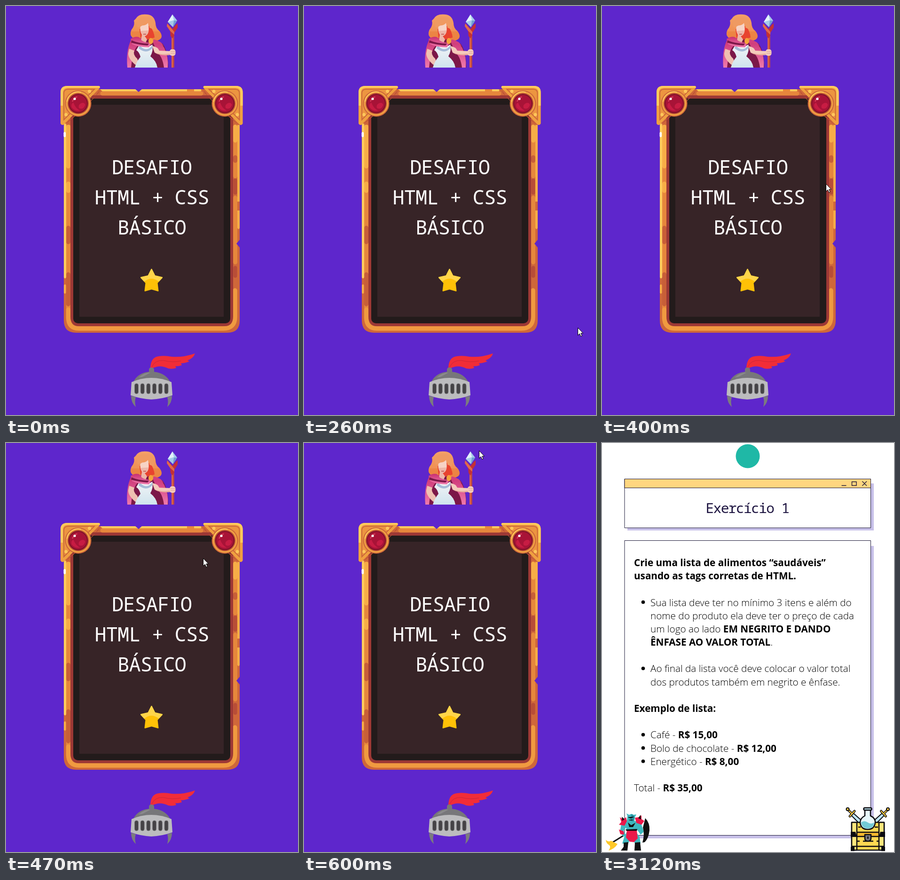
Recreate the animation shown at these times as an HTML page. Size 621 by 870 pixels, loop 8000 ms.

```html
<!DOCTYPE html>
<html lang="pt-BR">
<head>
<meta charset="utf-8">
<title>Desafio HTML + CSS</title>
<style>
html, body { margin: 0; width: 100%; height: 100%; overflow: hidden; background: #5e26cc; }
svg { display: block; width: 100%; height: 100%; }
.page, .pointer { animation: 8s step-end infinite; }
.page { animation-name: turn; }
.pointer { animation-name: sweep; }
@keyframes turn { 0% { opacity: 0; } 39%, 100% { opacity: 1; } }
@keyframes sweep {
  0% { opacity: 0; transform: translate(588px, 830px); }
  2.375% { opacity: 1; transform: translate(588px, 830px); }
  3.25% { opacity: 1; transform: translate(582px, 684px); }
  4.125% { opacity: 1; transform: translate(552px, 526px); }
  5% { opacity: 1; transform: translate(476px, 378px); }
  5.875% { opacity: 1; transform: translate(419px, 245px); }
  6.75% { opacity: 1; transform: translate(410px, 116px); }
  7.5% { opacity: 1; transform: translate(372px, 16px); }
  8.375%, 100% { opacity: 0; transform: translate(372px, 16px); }
}
.mono { font-family: "Noto Sans Mono", "DejaVu Sans Mono", monospace; text-anchor: middle; }
.sign { font-size: 42px; font-weight: 400; letter-spacing: -.9px; fill: #fff; }
.heading { font-size: 29.5px; font-weight: 500; letter-spacing: -1.6px; fill: #1d1440; }
.copy { font: 300 20.69px "Open Sans", "Noto Sans", sans-serif; fill: #000; }
.copy tspan { font-weight: 700; }
.box { fill: #fff; stroke: #1d1838; }
</style>
</head>
<body>
<svg viewBox="0 0 621 870">
  <defs>
    <linearGradient id="cape" x1="0" y1="0" x2="0" y2="1"><stop stop-color="#c92f70"/><stop offset="1" stop-color="#ef79ac"/></linearGradient>
    <linearGradient id="dress" x1="0" y1="0" x2="0" y2="1"><stop stop-color="#f3f4f6"/><stop offset="1" stop-color="#cfe4ee"/></linearGradient>
    <linearGradient id="hair" x1="0" y1="0" x2="0" y2="1"><stop stop-color="#f3a068"/><stop offset="1" stop-color="#ef8848"/></linearGradient>

    <g id="corner">
      <path fill="#b84c35" d="M123 254L143 238L186 197L200 178L196 186L178 203Z"/>
      <path fill="#f0a040" d="M130 170H198Q202 172 198 176L124 251Q119 256 116 250V184Q116 170 130 170Z"/>
      <path fill="#ffcb5c" d="M130 170H198Q201 172 199 174H131Q121 174 121 184V212H116V184Q116 170 130 170Z"/>
      <path fill="#ec9540" stroke="#cc673a" stroke-width="2" d="M132 177H188L123 242V186Q123 177 132 177Z"/>
      <circle cx="177.500" cy="181.500" r="3.500" fill="#ffc65a"/>
      <circle cx="127.500" cy="231" r="3.500" fill="#ffc65a"/>
    </g>
    <g id="gem">
      <circle r="28" fill="#cb643a"/>
      <circle r="26" fill="#f0a042"/>
      <path fill="none" stroke="#ffcb5c" stroke-width="2" d="M-24 -4A24 24 0 0 1 6 -24"/>
      <circle r="22.500" fill="#b84c35"/>
      <circle r="20.500" fill="#7d1029"/>
      <circle r="18.500" fill="#a81337"/>
      <path fill="#c71c43" d="M-14 8Q-16 0 -10 -2Q-6 10 4 15Q-7 17 -14 8ZM2 10Q-1 4 5 0Q13 -4 15 3Q11 14 2 10Z"/>
      <path fill="none" stroke="#d13a57" stroke-width="2.500" stroke-linecap="round" d="M-12 -5Q-9 -12 -3 -14"/>
      <circle cx="-7.500" cy="-10" r="2.600" fill="#fff"/>
    </g>
    <path id="cheek" fill="#7c7c7e" d="M266 829L276 832Q273 841 276 853Q266 844 266 829Z"/>
    <rect id="slot" x="-4" y="803" width="8" height="22" rx="4"/>
    <g id="sword">
      <path fill="#bfe5f5" stroke="#0b0b10" stroke-width="2" d="M533 786L562 812L556 818L529 791Z"/>
      <path stroke="#0b0b10" stroke-width="5" stroke-linecap="round" d="M523 780L532 789M537 783L527 794"/>
      <path stroke="#ffcf3f" stroke-width="2" stroke-linecap="round" d="M523 780L531 788M537 783L527 794"/>
      <circle cx="522.500" cy="779" r="3" fill="#ffcf3f" stroke="#0b0b10" stroke-width="2"/>
    </g>
  </defs>

  <rect width="621" height="870" fill="#5e26cc"/>

  <!-- sorceress -->
  <g>
    <path fill="#7c1848" d="M266 76Q300 62 333 80Q345 97 345 131H259Q256 100 266 76Z"/>
    <path fill="url(#cape)" d="M266 72Q280 64 292 70L283 83Q270 88 266 131H258Q255 94 266 72ZM310 72Q330 76 337 90Q346 108 344 131H336Q333 109 323 100Z"/>
    <path fill="#efc0b1" d="M262 91L273 95Q269 103 279 112L283 122L275 125Q260 112 260 101Z"/>
    <path fill="url(#dress)" d="M284 82Q299 91 311 82Q314 95 307 107Q320 117 322 131H274Q277 119 286 108Q283 97 277 94Z"/>
    <path fill="#a6bcd8" d="M284 84Q299 100 312 83V89Q299 104 282 90Z"/>
    <path fill="#f4cbbc" d="M311 85Q323 87 326 95L351 96V104Q328 106 316 99Z"/>
    <path fill="#e9ac9d" d="M316 99Q330 104 351 101V104Q328 107 316 99Z"/>
    <path fill="url(#hair)" d="M276 27Q282 16 300 18Q315 19 318 36Q318 47 326 53Q335 65 327 71Q317 78 307 69L280 68Q268 71 265 61Q264 53 270 46Q274 39 272 31Z"/>
    <path fill="#ec803e" d="M266 54H327Q335 66 327 71Q317 78 307 69L280 68Q268 71 265 61Z" opacity=".65"/>
    <path fill="#e8432f" d="M284 49L306 42Q315 54 316 67L299 72L286 67Z"/>
    <path fill="#f7d3c5" d="M286 41Q297 43 302 36Q306 54 300 61Q295 67 289 61Q284 53 286 41Z"/>
    <path fill="#edb6a8" d="M286 53L303 52Q302 61 295 64L300 71L297 78L287 74L289 61Z"/>
    <path fill="#ef9a62" d="M280 46Q291 44 299 31Q305 35 305 46L314 50Q318 34 305 24H288Q275 30 280 46Z"/>
    <path stroke="#b43b3a" stroke-width="1.300" d="M292 60H298"/>
    <path fill="url(#cape)" d="M265 70Q276 63 284 67Q289 79 310 78L304 88Q283 88 268 81Z"/>
    <path fill="#7c1848" d="M267 73Q283 80 304 80L301 84Q284 83 266 78Z"/>
    <path fill="#d2417f" d="M310 77L315 71Q331 75 335 85L326 80Z"/>
    <ellipse cx="308" cy="74.500" rx="5" ry="6.500" fill="#f5a43b"/>
    <path fill="#d96048" d="M352 58H357.500V131H352Z"/>
    <path fill="#b9433f" d="M355.500 65H357.500V131H355.500Z"/>
    <path fill="#c23037" d="M343 37L342 43L349 53L350 64L354 69L358 63V57L365 46V37L361 40L354 49Z"/>
    <path fill="#e2694b" d="M343 37L342 43L349 53L358 61V55Z"/>
    <path fill="#a5cbea" d="M354 18L364 31L355 45L344 34Z"/>
    <path fill="#e4f3fb" d="M354 18L357 30L344 34Z"/>
    <path fill="#6f9ed2" d="M357 31L364 31L355 45Z"/>
    <rect x="348" y="92" width="12.500" height="14" rx="5" fill="#f4cbbc"/>
    <path stroke="#dc9f92" d="M350 97H360M350 101H360"/>
  </g>

  <!-- framed board -->
  <path fill="#cf673a" d="M123 177H497V669Q497 695 471 695H149Q123 695 123 669Z"/>
  <path fill="#e6873c" d="M128 253H137V660H128Z"/>
  <path fill="none" stroke="#f09a40" stroke-width="9.500" stroke-linecap="round" d="M132.500 646V663Q133 686 155 686H462Q487 686 487 661V605"/>
  <path fill="#9d3835" d="M137 190H483V660Q483 681 465 681H155Q137 681 137 660Z"/>
  <rect x="143" y="197" width="334" height="478" rx="10" fill="#231b1b"/>
  <rect x="156" y="210" width="307" height="451" fill="#372427"/>

  <g fill="none" stroke-linecap="round">
    <path stroke="#e6873c" stroke-width="9" d="M205 186H415M487.500 257V362M487.500 408V545"/>
    <path stroke="#f7ad47" stroke-width="9" d="M132.500 257V341M132.500 378V393M487.500 257V286"/>
    <path stroke="#c85f38" stroke-width="9" d="M132.500 472V502M132.500 571V634M487.500 322V329"/>
    <path stroke="#b84d37" stroke-width="8" d="M487.500 371V397M487.500 557V574"/>
  </g>
  <path fill="#ffcb5c" d="M200 177H385V181.500H205ZM400 177H414Q417 179 414 181.500H400ZM123 250H128V577Q125.500 582 123 577Z"/>
  <path fill="#e6873c" d="M385 177H400V182H385Z"/>
  <path fill="#f7ad47" d="M123 594Q125.500 590 127.500 594V610Q125.500 614 123 610ZM492 253H497V416H492ZM492 435H497V472Q494.500 477 492 472Z"/>
  <rect x="122.500" y="268" width="4.500" height="11" rx="2.200" fill="#fff"/>
  <path fill="#5e26cc" d="M274 176H290L282 183ZM498 496V515L490 505.500Z"/>

  <use href="#corner"/>
  <use href="#corner" transform="translate(619.500) scale(-1 1)"/>
  <use href="#gem" x="153.500" y="207.500"/>
  <use href="#gem" x="465.500" y="207.500"/>

  <g class="mono sign">
    <text x="310" y="358">DESAFIO</text>
    <text x="310" y="422">HTML + CSS</text>
    <text x="310" y="486">BÁSICO</text>
  </g>

  <g stroke-linejoin="round" stroke-width="2">
    <path fill="#ffc107" stroke="#ffc107" d="M309.500 560L316.500 574L332 577.500L321.500 589L323.500 606L309.500 602L295.500 606L297.500 589L287 577.500L302.500 574Z"/>
    <path fill="#ffd54a" stroke="#ffd54a" d="M309.500 560L316.500 574L332 577.500L325 585Q309 573 294 585L287 577.500L302.500 574Z"/>
  </g>

  <!-- helmet -->
  <path fill="#f12d38" d="M307 772Q307 747 325 745Q338 743 352 746Q377 748 402 739Q399 749 386 754L390 756Q380 760 372 760L374 764Q366 767 360 766L362 770Q354 773 345 771Q327 762 311 771Z"/>
  <path fill="none" stroke="#c92539" d="M310 768Q316 753 335 754Q354 759 372 755"/>
  <path fill="#77777a" d="M271 799Q282 778 309 778Q337 778 349 799Z"/>
  <path fill="#8a8a8c" d="M282 790Q295 779 309 779L290 789Z"/>
  <path fill="#77777a" d="M304 780V774Q304 769 309 769Q315 769 315 774V780Z"/>
  <use href="#cheek"/>
  <use href="#cheek" transform="translate(619) scale(-1 1)"/>
  <path fill="#bcbcbe" d="M267 800Q288 791 309 791Q331 791 352 800L354 828Q332 836 309 837Q287 836 265 828Z"/>
  <g fill="#454346" stroke="#7f7f82">
    <use href="#slot" x="277.500"/><use href="#slot" x="290.200"/><use href="#slot" x="302.900"/>
    <use href="#slot" x="315.600"/><use href="#slot" x="328.300"/><use href="#slot" x="341"/>
  </g>

  <path class="pointer" fill="#fff" stroke="#000" stroke-linejoin="round" d="M.5 .5V16.500L4.200 13L6.800 18.800L9.300 17.700L6.800 12H11.500Z"/>

  <g class="page">
    <rect width="621" height="870" fill="#fff"/>
    <circle cx="310" cy="28" r="25.500" fill="#1fb8a6"/>
    <path fill="#c7c0e8" d="M54 86H578V186H54ZM54 219H578V841H54Z"/>
    <path class="box" d="M48 76.500H571.500V180.500H48ZM48 207.500H571.500V834.500H48Z"/>
    <path fill="#ffd680" stroke="#1d1838" d="M48 76.500H571.500V95.500H48Z"/>
    <path fill="none" stroke="#1d1838" stroke-width="1.400" d="M509.500 90.500H519.500M531.500 82.500H541V90.500H531.500ZM553.500 81.500L563 91M563 81.500L553.500 91"/>
    <text class="mono heading" x="309" y="149">Exercício 1</text>

    <g class="copy">
      <text x="68" y="262"><tspan>Crie uma lista de alimentos “saudáveis”</tspan></text>
      <text x="68" y="290.200"><tspan>usando as tags corretas de HTML.</tspan></text>
      <text x="103" y="346.500">Sua lista deve ter no mínimo 3 itens e além do</text>
      <text x="103" y="374.700">nome do produto ela deve ter o preço de cada</text>
      <text x="103" y="402.900">um logo ao lado <tspan>EM NEGRITO E DANDO</tspan></text>
      <text x="103" y="431.100"><tspan>ÊNFASE AO VALOR TOTAL</tspan>.</text>
      <text x="103" y="487.400">Ao final da lista você deve colocar o valor total</text>
      <text x="103" y="515.600">dos produtos também em negrito e ênfase.</text>
      <text x="68" y="572"><tspan>Exemplo de lista:</tspan></text>
      <text x="103" y="628.300">Café - <tspan>R$ 15,00</tspan></text>
      <text x="103" y="656.500">Bolo de chocolate - <tspan>R$ 12,00</tspan></text>
      <text x="103" y="684.700">Energético - <tspan>R$ 8,00</tspan></text>
      <text x="68" y="741">Total - <tspan>R$ 35,00</tspan></text>
    </g>
    <path stroke="#000" stroke-width="7.600" stroke-linecap="round" d="M87.500 338.500h0M87.500 479.500h0M87.500 620.500h0M87.500 648.700h0M87.500 677h0"/>

    <!-- goblin -->
    <path stroke="#111" stroke-width="3" d="M20 851L49 833"/>
    <path fill="#ffc928" d="M8 844Q14 850 19 846L33 853Q27 863 14 867Q20 858 15 855Q9 852 8 844Z"/>
    <path fill="#3fb8bf" d="M54 793L52 788L58 791Q63 787 67 791L73 790L70 796L69 804L82 806L86 818L89 827L82 833L75 823L73 828L80 838L82 852H70L64 838L55 852H43L48 836L53 827L51 818L46 825L50 833L46 838L38 828L41 811L53 804Z"/>
    <path fill="#ec184a" d="M38 796L45 801L51 796L53 804L48 814L36 812L41 806ZM70 797L78 796L84 792L84 800L90 804L84 812L73 808ZM53 824H74L76 841L68 849L59 848L51 839ZM36 822L46 826L47 833L39 832Z"/>
    <path fill="#111" d="M42 795L48 800L43 804ZM82 791L83 801L77 798ZM50 822L75 821L74 825H52ZM46 850L56 849L54 867H40L46 859ZM70 850L81 849L83 867H69ZM55 807L62 813L71 808L66 817H58Z"/>
    <path fill="#111" d="M92 798Q102 808 101 824Q99 841 91 849L86 850Q91 833 87 818Z"/>
    <path fill="#288f9d" d="M62 790Q68 790 69 797L67 805L61 804Z"/>
    <path stroke="#111" stroke-width="1.500" d="M56 796L61 798L67 795M58 802H65"/>

    <!-- treasure chest -->
    <use href="#sword"/>
    <use href="#sword" transform="translate(1130.500) scale(-1 1)"/>
    <g stroke="#0b0b10" stroke-width="2.500" stroke-linejoin="round">
      <path fill="#ffd852" d="M531 807H600V866H531Z"/>
      <path fill="#f6b92e" d="M531 828H600V837H531Z"/>
      <path fill="#ffe77d" d="M531 807H542V866H531ZM589 807H600V866H589Z"/>
      <path fill="none" d="M531 858H600M542 847H548M555 847H577M584 847H589M545 817H550M580 817H587"/>
      <path fill="#e7f7fb" d="M559 780H571V793Q582 798 581 808Q579 822 565 822Q551 822 549 808Q549 798 559 793Z"/>
      <path fill="#73cad6" stroke="none" d="M551 807Q558 802 565 807T579 807Q578 820 565 820Q553 820 551 807Z"/>
      <rect x="556.500" y="776" width="17" height="5" rx="2.500" fill="#b8dce6"/>
      <path fill="#77777e" d="M559 833H572V841Q572 847 565.500 847Q559 847 559 841Z"/>
      <path d="M565.500 837V842"/>
    </g>
    <path fill="#0b0b10" d="M529 827H539L542 838H529ZM592 827H602V838H589ZM529 859H537V868H529ZM594 859H602V868H594Z"/>
  </g>
</svg>
</body>
</html>
```
